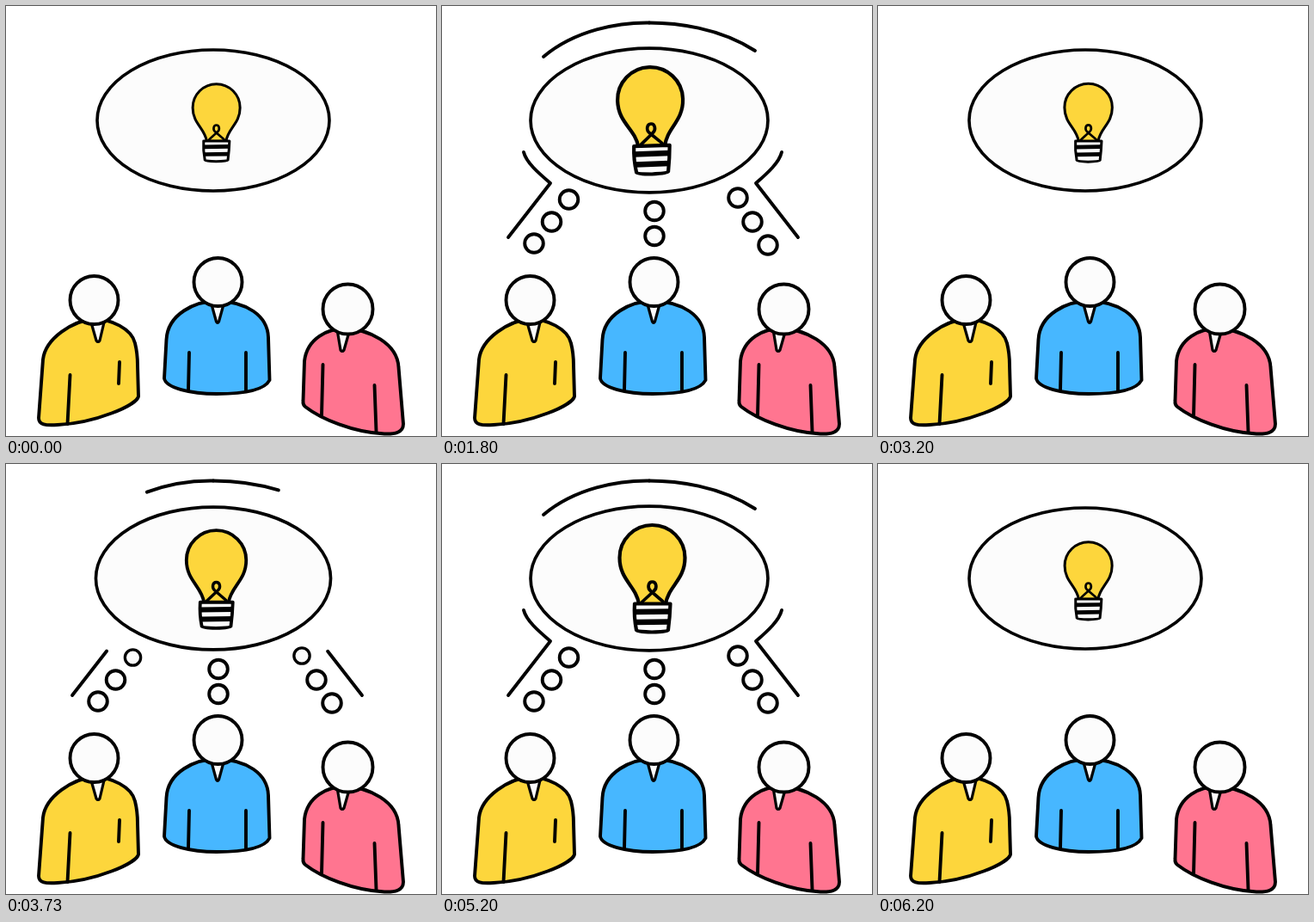
These frames come from a looping animation (500x500 px, 6.23 s). An HTML page:

```html
<!DOCTYPE html>
<html lang="en">
<head>
<meta charset="utf-8">
<title>Shared idea</title>
<style>
html, body { margin: 0; width: 100%; height: 100%; overflow: hidden; background: #fff; }
svg { display: block; width: 100vw; height: 100vh; }
</style>
</head>
<body>
<svg viewBox="0 0 500 500" fill="#fcfcfc" stroke="#000" stroke-width="3.9" stroke-linecap="round" stroke-linejoin="round">
  <ellipse id="bubble" rx="135" ry="82" stroke-width="3.6"/>

  <g id="bulb" stroke-width="4.2">
    <path fill="#fdd63c" d="M229 163C226 142 206.500 135 206.500 109A38 38 0 0 1 282.500 109C282.500 135 263 142 260 163Z"/>
    <path fill="none" stroke-width="3.700" d="M232 161L246 148C251 144 249 137 244.500 137S238 144 243 148L257 160"/>
    <path d="M224 162.500H265.500Q265 178 263 193Q262 195 244 195.500Q227 195 226 193Q223 178 224 162.500Z"/>
    <path fill="none" stroke-width="6.500" stroke-linecap="butt" d="M224 172L265 171.500M225 184L264 183.500"/>
  </g>

  <g id="rays" fill="none">
    <path pathLength="1" d="M241 19.500C205 19 155 28 118 59"/>
    <path pathLength="1" d="M241 19.500C272 19.500 322 25 364 52"/>
    <path pathLength="1" d="M77 269L126 206C112 194 98 182 95 170"/>
    <path pathLength="1" d="M414 269L365 206C379 194 392 182 395 170"/>
  </g>

  <g id="dots"></g>

  <g>
    <path fill="#fdd63c" d="M38 479L43 411C46 386 78 366 102 364C122 364 146 375 150 392Q153 404 153 418L154 454C152 464 104 485 60 487C46 488 38 487 38 479Z"/>
    <path stroke-width="3.200" d="M99 368L105 389Q107 392 109 389L114 368Z"/>
    <path d="M74.500 429L71.500 486M132 414L131 439"/>
    <circle cx="102.500" cy="342" r="28"/>
  </g>
  <g>
    <path fill="#47b7ff" d="M184 433L186.500 388C188 358 220 343 246 343C280 344 304 360 305 385L306.500 435C300 448 272 451 245 451C214 451 186 444 184 433Z"/>
    <path stroke-width="3.200" d="M239 347L244.500 367Q246 370 247.500 367L253 347Z"/>
    <path d="M213 403L212 447M279 403V448"/>
    <circle cx="246.500" cy="321" r="28"/>
  </g>
  <g>
    <path fill="#ff7590" d="M345.500 459L347 413C350 386 375 375 394 375C422 376 455 392 456.500 420L462 486C462 496 452 498 440 497.500C404 496 366 480 348 466Q345 464 345.500 459Z"/>
    <path stroke-width="3.200" d="M385.500 379L389 400Q391 403 393 400L399 379Z"/>
    <path d="M368.500 417L367 476M428.500 441L430.500 495"/>
    <circle cx="397.500" cy="352.500" r="29"/>
  </g>
</svg>
<script>
const LOOP = 6230, CYCLE = LOOP / 2;
const $ = id => document.getElementById(id);

// Eased progress from 0 to 1 between two times
const ease = (t, from, to) => {
  const p = Math.min(1, Math.max(0, (t - from) / (to - from)));
  return p * p * (3 - 2 * p);
};

// x, y, order (0 is nearest to the heads)
const dots = [
  [107, 276, 0], [127.5, 251, 1], [147.5, 225, 2],
  [247, 267.5, 0], [247, 238.5, 1],
  [379, 278, 0], [361, 251, 1], [344, 223, 2]
].map(([x, y, order]) => {
  const el = document.createElementNS("http://www.w3.org/2000/svg", "circle");
  el.setAttribute("r", 10.8);
  $("dots").append(el);
  return { el, x, y, order };
});
const rays = [...$("rays").children];

function trim(el, start, end) {
  el.style.display = end - start < 0.03 ? "none" : "";
  el.setAttribute("stroke-dasharray", `${end - start} 2`);
  el.setAttribute("stroke-dashoffset", -start);
}

function draw(now) {
  const t = now % CYCLE;

  const bubble = 1 + 0.022 * (ease(t, 0, 1200) - ease(t, 2600, 3100));
  $("bubble").setAttribute("transform", `translate(241 133) scale(${bubble})`);

  const size = 0.724 + 0.276 * (ease(t, 0, 980) - ease(t, CYCLE - 1000, CYCLE));
  const swing = t > 1000 && t < 2085 ? 1.7 * Math.sin(2 * Math.PI * (t - 1000) / 1085) : 0;
  $("bulb").setAttribute("transform",
    `translate(245 142.4) scale(${size}) translate(-245 -142.4) rotate(${swing} 244.5 190)`);

  rays.forEach((el, i) => i < 2
    ? trim(el, ease(t, 2250, 3080), ease(t, 0, 1090))
    : trim(el, ease(t, 2210, 3060), ease(t, 0, 1215)));

  for (const { el, x, y, order } of dots) {
    const up = 100 + 145 * order, down = [2250, 2470, 2590][order];
    const s = ease(t, up, up + 300) - ease(t, down, down + 300);
    el.style.display = s < 0.02 ? "none" : "";
    el.setAttribute("transform", `translate(${x} ${y}) scale(${s})`);
  }
}

const begin = performance.now();
(function tick() {
  draw(performance.now() - begin);
  requestAnimationFrame(tick);
})();
</script>
</body>
</html>
```
